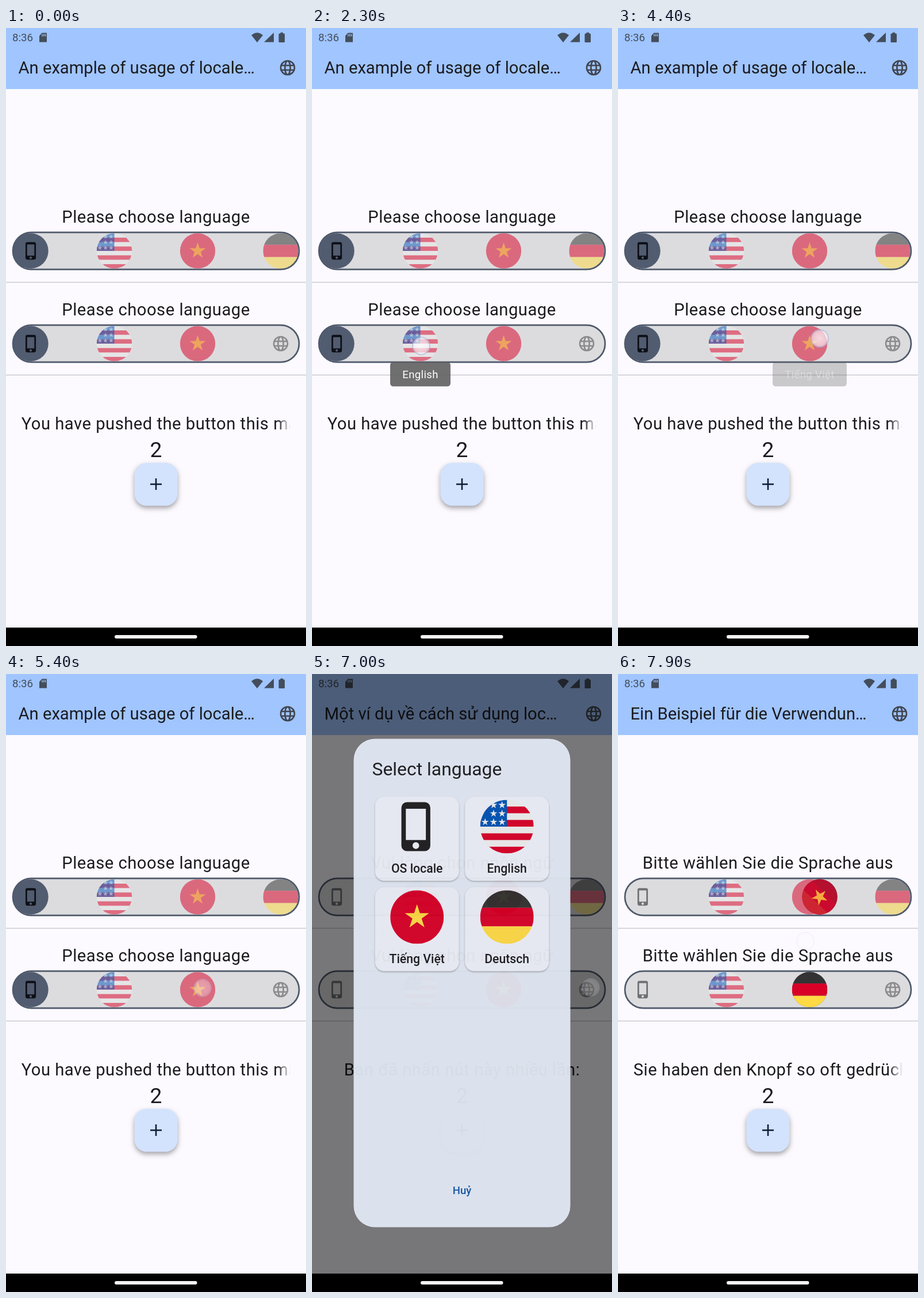
An HTML page with a canvas for the animation above (8000 ms loop, 522 by 1073 pixels).

```html
<!DOCTYPE html>
<html lang="en">
<head>
<meta charset="utf-8">
<title>Locale switcher</title>
<style>
  html, body { margin: 0; width: 100%; height: 100%; overflow: hidden; background: #fcfaff; }
  canvas { display: block; width: 522px; height: 1073px; }
</style>
</head>
<body>
<canvas id="stage"></canvas>
<script>
const W = 522, H = 1073, LOOP = 8000, STEP = 100;
const canvas = document.getElementById('stage');
const ratio = window.devicePixelRatio || 1;
canvas.width = W * ratio;
canvas.height = H * ratio;
const c = canvas.getContext('2d');

const INK = '#1b1b1f', SLATE = '#525c70', TAU = Math.PI * 2;
const RED = '#d80027', GOLD = '#ffda44', WHITE = '#eeeeee';
const SLOTS = [43, 188.5, 333.5, 478];
const ROW_1 = 387, ROW_2 = 548, RADIUS = 30.7;
const TO_VI = 5420, TO_DE = 7750, OPEN = 6880, CLOSE = 7740;

const TEXTS = {
  en: ['An example of usage of locale…', 'Please choose language', 'You have pushed the button this many times:'],
  vi: ['Một ví dụ về cách sử dụng loc…', 'Vui lòng chọn ngôn ngữ', 'Bạn đã nhấn nút này nhiều lần:'],
  de: ['Ein Beispiel für die Verwendun…', 'Bitte wählen Sie die Sprache aus', 'Sie haben den Knopf so oft gedrückt:']
};
const TOUCHES = [
  { x: 39, y: 558, down: 640, up: 1450 },
  { x: 190, y: 552, down: 1720, up: 2400 },
  { x: 464, y: 551, down: 2600, up: 3500 },
  { x: 351, y: 539, down: 3860, up: 4500 },
  { x: 342, y: 545, down: 4880, up: 5300 },
  { x: 485, y: 544, down: 6680, up: 6860 },
  { x: 326, y: 464, down: 7460, up: 7730 }
];
const TIPS = [
  { label: 'OS locale', x: SLOTS[0], on: 1040, off: 1720 },
  { label: 'English', x: SLOTS[1], on: 2120, off: 2600 },
  { label: 'Show other locales', x: SLOTS[3], on: 3000, off: 3860 },
  { label: 'Tiếng Việt', x: SLOTS[2], on: 4355, off: 4880 }
];

const clamp = (v, lo = 0, hi = 1) => Math.min(hi, Math.max(lo, v));

function bezier(x1, y1, x2, y2) {
  const at = (a, b, u) => 3 * u * (1 - u) ** 2 * a + 3 * u * u * (1 - u) * b + u ** 3;
  return t => {
    t = clamp(t);
    if (t === 0 || t === 1) return t;
    let lo = 0, hi = 1;
    for (let i = 0; i < 24; i++) {
      const mid = (lo + hi) / 2;
      if (at(x1, x2, mid) < t) lo = mid; else hi = mid;
    }
    return at(y1, y2, lo);
  };
}
const easeInOutCirc = bezier(.785, .135, .15, .86);
const fastOutSlowIn = bezier(.4, 0, .2, 1);
const ease = bezier(.25, .1, .25, 1);
const easeOut = bezier(0, 0, .58, 1);

function withAlpha(alpha, draw) {
  if (alpha <= 0) return;
  c.save();
  c.globalAlpha *= alpha;
  draw();
  c.restore();
}

function rect(x, y, w, h, fill) {
  c.fillStyle = fill;
  c.fillRect(x, y, w, h);
}

function roundRect(x, y, w, h, r, fill) {
  c.beginPath();
  c.roundRect(x, y, w, h, r);
  if (fill) { c.fillStyle = fill; c.fill(); }
}

function disc(x, y, r, fill) {
  c.beginPath();
  c.arc(x, y, r, 0, TAU);
  c.fillStyle = fill;
  c.fill();
}

function shape(points, fill) {
  c.beginPath();
  points.forEach(([x, y]) => c.lineTo(x, y));
  c.closePath();
  c.fillStyle = fill;
  c.fill();
}

function raised(y, blur, color, draw) {
  c.save();
  c.shadowColor = color;
  c.shadowBlur = blur * ratio;
  c.shadowOffsetY = y * ratio;
  draw();
  c.restore();
}

function text(str, x, y, size, { fill = INK, align = 'left', weight = 400, spacing = 0 } = {}) {
  c.font = `${weight} ${size}px Roboto, sans-serif`;
  c.letterSpacing = spacing + 'px';
  c.textAlign = align;
  c.fillStyle = fill;
  c.fillText(str, x, y);
}

function star(x, y, r, fill) {
  const points = [];
  for (let i = 0; i < 10; i++) {
    const a = i * TAU / 10, d = i % 2 ? r * .382 : r;
    points.push([x + d * Math.sin(a), y - d * Math.cos(a)]);
  }
  shape(points, fill);
}

// Icons and flags are drawn around the origin
const PHONE = new Path2D('M4-11h-8a2.5 2.5 0 0 0-2.5 2.5v17a2.5 2.5 0 0 0 2.5 2.5h8a2.5 2.5 0 0 0 2.5-2.5v-17a2.5 2.5 0 0 0-2.5-2.5z' +
  'M0 10a1.5 1.5 0 1 1 0-3 1.5 1.5 0 0 1 0 3zM4.5 6h-9v-14h9z');

function phone(scale, fill) {
  c.save();
  c.scale(scale, scale);
  c.fillStyle = fill;
  c.fill(PHONE, 'evenodd');
  c.restore();
}

function globe(x, y, color) {
  c.save();
  c.translate(x, y);
  c.scale(1.33, 1.33);
  c.strokeStyle = color;
  c.lineWidth = 2;
  c.beginPath();
  c.arc(0, 0, 9, 0, TAU);
  c.moveTo(3.5, 0);
  c.ellipse(0, 0, 3.5, 9, 0, 0, TAU);
  const half = Math.sqrt(72);
  for (const line of [-3, 3]) { c.moveTo(-half, line); c.lineTo(half, line); }
  c.stroke();
  c.restore();
}

const FLAGS = {
  us() {
    rect(0, 0, 512, 512, WHITE);
    for (let y = 64; y < 512; y += 128) rect(0, y, 512, 64, RED);
    rect(0, 0, 256, 256, '#0052b4');
    for (let row = 0; row < 3; row++)
      for (let col = row < 2 ? 1 : 0; col < 3; col++) star(47 + 81 * col, 50 + 81 * row, 37, WHITE);
  },
  vi() {
    rect(0, 0, 512, 512, RED);
    star(256, 256, 122, GOLD);
  },
  de() {
    rect(0, 0, 512, 167, '#333333');
    rect(0, 167, 512, 178, RED);
    rect(0, 345, 512, 167, GOLD);
  }
};

function icon(name, r) {
  if (name === 'phone') return phone(r / 22, '#0d1016');
  if (name === 'globe') return globe(0, 0, INK);
  c.save();
  c.beginPath();
  c.arc(0, 0, r, 0, TAU);
  c.clip();
  c.scale(r / 256, r / 256);
  c.translate(-256, -256);
  FLAGS[name]();
  c.restore();
}

function iconAt(name, x, y, r, angle = 0) {
  c.save();
  c.translate(x, y);
  c.rotate(angle);
  icon(name, r);
  c.restore();
}

function toggle(y, items, from, to, p) {
  roundRect(12, y - 32.2, 498, 64.4, 32.2, '#dcdcde');
  c.save();
  c.clip();
  items.forEach((name, i) =>
    withAlpha(name === 'globe' ? .42 : .52, () => iconAt(name, SLOTS[i], y, RADIUS)));
  c.restore();

  c.lineWidth = 2.7;
  c.strokeStyle = '#4f596b';
  roundRect(12, y - 32.2, 498, 64.4, 32.2);
  c.stroke();

  const pos = from + (to - from) * p;
  const x = SLOTS[from] + (SLOTS[to] - SLOTS[from]) * p;
  disc(x, y, RADIUS, SLATE);
  withAlpha(1 - p, () => iconAt(items[from], x, y, RADIUS, pos * TAU));
  withAlpha(p, () => iconAt(items[to], x, y, RADIUS, pos * TAU));
}

function statusBar() {
  const ink = '#434d5c';
  text('8:36', 11, 23, 18.7, { fill: ink });
  shape([[62.5, 8.5], [71, 8.5], [71, 24.5], [58, 24.5], [58, 13.5]], ink);
  for (let i = 0; i < 3; i++) rect(62.3 + i * 2.8, 10.5, 1.4, 4, '#a0c5ff');

  c.beginPath();
  c.moveTo(437, 25);
  c.lineTo(427, 12.5);
  c.quadraticCurveTo(437, 4, 447, 12.5);
  c.closePath();
  c.fillStyle = ink;
  c.fill();
  shape([[466, 8], [466, 24.5], [449, 24.5]], ink);
  roundRect(474.5, 9.5, 10.5, 15.5, 1.5, ink);
  rect(477.5, 7.8, 4.5, 2.5, ink);
}

function counter(label) {
  const size = 29.2, spacing = .5;
  c.font = `400 ${size}px Roboto, sans-serif`;
  c.letterSpacing = spacing + 'px';
  if (c.measureText(label).width <= 468) {
    text(label, W / 2, 697, size, { align: 'center', spacing });
  } else {
    const fade = c.createLinearGradient(472, 0, 495, 0);
    fade.addColorStop(0, INK);
    fade.addColorStop(1, 'rgba(27,27,31,0)');
    text(label, 26.7, 697, size, { fill: fade, spacing });
  }
  text('2', W / 2, 745, 37.2, { align: 'center' });

  raised(4, 9, 'rgba(0,0,0,.36)', () => roundRect(223.5, 755, 75, 74.5, 21, '#d3e3fe'));
  rect(251, 790.8, 20, 2.6, '#0f1c33');
  rect(259.7, 782, 2.6, 20, '#0f1c33');
}

function page(t) {
  const lang = t < TO_VI ? 'en' : t < TO_DE ? 'vi' : 'de';
  const [title, prompt, pushed] = TEXTS[lang];
  rect(0, 0, W, H, '#fcfaff');
  rect(0, 0, W, 106, '#a0c5ff');
  statusBar();
  text(title, 21.5, 78.5, 29.2);
  globe(490, 69, '#40454f');

  const viP = easeInOutCirc((t - TO_VI) / 500), deP = easeInOutCirc((t - TO_DE) / 500);
  const german = lang === 'de';
  for (const y of [ROW_1, ROW_2]) {
    text(prompt, W / 2, y - 49, 29.2, { align: 'center', spacing: .5 });
    rect(0, y + 53.8, W, 1.4, '#c6c7ce');
  }
  const all = ['phone', 'us', 'vi', 'de'];
  if (german) toggle(ROW_1, all, 2, 3, deP);
  else toggle(ROW_1, all, 0, 2, viP);
  toggle(ROW_2, ['phone', 'us', german ? 'de' : 'vi', 'globe'], 0, 2, viP);
  counter(pushed);
}

function tooltip({ label, x, on, off }, t) {
  const alpha = t < off ? fastOutSlowIn((t - on) / 150) : clamp(1 - (t - off) / 75);
  withAlpha(alpha, () => {
    const spacing = .33;
    c.font = '400 18.6px Roboto, sans-serif';
    c.letterSpacing = spacing + 'px';
    const w = c.measureText(label).width + 42.5;
    const left = clamp(x - w / 2, 13.3, 508.7 - w);
    roundRect(left, 580, w, 42.3, 5.3, 'rgba(97,97,97,.9)');
    text(label, left + w / 2, 607.5, 18.6, { fill: '#fff', align: 'center', spacing });
  });
}

function card(name, label, x, y) {
  raised(1.5, 3, 'rgba(0,0,0,.28)', () => roundRect(x, y, 146, 146, 16, '#eef0f9'));
  if (name === 'phone') {
    c.save();
    c.translate(x + 71, y + 52);
    phone(3.87, '#1d1d20');
    c.restore();
  } else {
    iconAt(name, x + 73, y + 52, 46.5);
  }
  text(label, x + 73, y + 132, 21.2, { align: 'center', weight: 500 });
}

function dialogPanel() {
  roundRect(72.5, 112.5, 377, 848, 37, '#e3eaf5');
  text('Select language', 104.5, 176, 31.9);
  card('phone', 'OS locale', 109.7, 213);
  card('us', 'English', 266.2, 213);
  card('vi', 'Tiếng Việt', 109.7, 370);
  card('de', 'Deutsch', 266.2, 370);
  text('Huỷ', W / 2, 903, 18.6, { fill: '#1157a8', align: 'center', weight: 500 });
}

// The panel is composed off screen so that it fades as one layer
const layer = document.createElement('canvas');
layer.width = canvas.width;
layer.height = canvas.height;
const screenCtx = c, layerCtx = layer.getContext('2d');

function dialog(t) {
  const p = t < CLOSE ? (t - OPEN) / 150 : 1 - (t - CLOSE) / 150;
  if (p <= 0) return;
  rect(0, 0, W, H, `rgba(0,0,0,${.54 * ease(p)})`);
  withAlpha(easeOut(p), () => c.drawImage(layer, 0, 0, W, H));
}

function touch({ x, y, down, up }, t) {
  const alpha = t < up ? clamp((t - down) / 60) : clamp(1 - (t - up) / 200);
  withAlpha(alpha, () => {
    const glow = c.createRadialGradient(x, y, 0, x, y, 16);
    glow.addColorStop(0, 'rgba(255,255,255,.75)');
    glow.addColorStop(.75, 'rgba(250,250,255,.62)');
    glow.addColorStop(1, 'rgba(235,238,252,.4)');
    disc(x, y, 15.5, glow);
    c.beginPath();
    c.arc(x, y, 15, 0, TAU);
    c.lineWidth = 2;
    c.strokeStyle = 'rgba(160,166,205,.5)';
    c.stroke();
  });
}

function navBar() {
  rect(0, 1041, W, 32, '#000');
  roundRect(189, 1054, 143.5, 6, 3, '#f4f4f4');
}

function render(t) {
  c.setTransform(ratio, 0, 0, ratio, 0, 0);
  page(t);
  TIPS.forEach(tip => tooltip(tip, t));
  dialog(t);
  navBar();
  TOUCHES.forEach(press => touch(press, t));
}

const painter = (() => {
  const start = performance.now();
  return () => {
    const t = (performance.now() - start) % LOOP;
    render(Math.floor(t / STEP) * STEP);
    requestAnimationFrame(painter);
  };
})();

function composePanel() {
  const draw = new Proxy({}, {});
  void draw;
}

// Copy the panel into its layer by drawing it once on the blank stage
screenCtx.setTransform(ratio, 0, 0, ratio, 0, 0);
dialogPanel();
layerCtx.drawImage(canvas, 0, 0);
painter();
</script>
</body>
</html>
```
